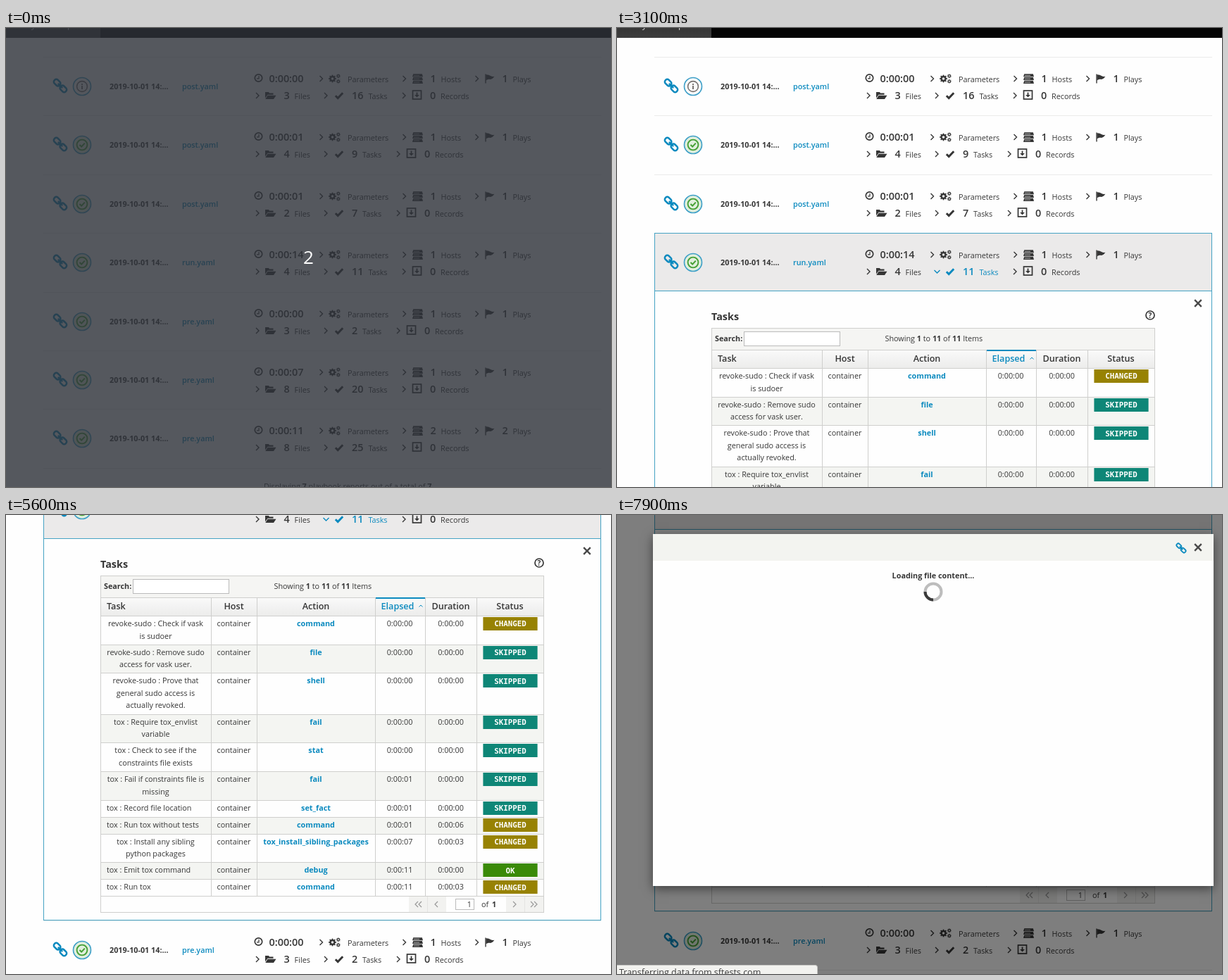
Write an HTML page with a canvas that moves like this. It is 859x652 px and loops after 8 s.

```html
<!DOCTYPE html>
<html lang="en">
<head>
<meta charset="utf-8">
<title>Playbook reports</title>
<style>
html, body { margin: 0; width: 100%; height: 100%; overflow: hidden; background: #fefefe; }
canvas { display: block; }
</style>
</head>
<body>
<canvas id="stage" width="859" height="652"></canvas>
<script>
const W = 859, H = 652, LOOP = 8000, TICK = 100;
const c = document.getElementById('stage').getContext('2d');
const INK = '#363636', BLUE = '#0b8abf', EDGE = '#45a3c4', LINE = '#cfcfcd', PAGE = '#fefefe';
const SANS = '"Open Sans", "Noto Sans", sans-serif';
const MONO = '"DejaVu Sans Mono", monospace';

const ROW_TOP = 41, ROW_H = 83.4, LEFT = 53, RIGHT = 845, OPEN_ROW = 3, OPEN_SHIFT = 541;
// file, elapsed, hosts and plays, files, tasks
const REPORTS = [
  ['post.yaml', '0:00:00', 1, 3, 16],
  ['post.yaml', '0:00:01', 1, 4, 9],
  ['post.yaml', '0:00:01', 1, 2, 7],
  ['run.yaml', '0:00:14', 1, 4, 11],
  ['pre.yaml', '0:00:00', 1, 3, 2],
  ['pre.yaml', '0:00:07', 1, 8, 20],
  ['pre.yaml', '0:00:11', 2, 8, 25]
];
// task lines, action, elapsed seconds, duration seconds, status
const TASKS = [
  ['revoke-sudo : Check if vask|is sudoer', 'command', 0, 0, 'CHANGED'],
  ['revoke-sudo : Remove sudo|access for vask user.', 'file', 0, 0, 'SKIPPED'],
  ['revoke-sudo : Prove that|general sudo access is|actually revoked.', 'shell', 0, 0, 'SKIPPED'],
  ['tox : Require tox_envlist|variable', 'fail', 0, 0, 'SKIPPED'],
  ['tox : Check to see if the|constraints file exists', 'stat', 0, 0, 'SKIPPED'],
  ['tox : Fail if constraints file is|missing', 'fail', 1, 0, 'SKIPPED'],
  ['tox : Record file location', 'set_fact', 1, 0, 'SKIPPED'],
  ['tox : Run tox without tests', 'command', 1, 6, 'CHANGED'],
  ['tox : Install any sibling|python packages', 'tox_install_sibling_packages', 7, 3, 'CHANGED'],
  ['tox : Emit tox command', 'debug', 11, 0, 'OK'],
  ['tox : Run tox', 'command', 11, 3, 'CHANGED']
];
const BADGE = { CHANGED: '#978203', SKIPPED: '#0e8677', OK: '#3a8a08' };
const COLS = [134, 291, 356, 524, 595, 668, 763];
const ROW_HEIGHTS = [0, 23.9, 40.7, 58.3];

// Stepped timelines: [start, value]
const SCROLL = [[0, 0], [4000, 38], [4200, 102], [4300, 151], [4700, 172], [4800, 226], [4900, 270],
  [5000, 292], [5300, 300], [5400, 313], [5500, 327], [5600, 340], [5700, 349], [5800, 353]];
const ROW_HOVER = [[0, -1], [900, 0], [1000, 2], [1100, 3], [1300, 4], [1400, 3], [1500, 4], [1700, 3]];
const TASK_HOVER = [[0, -1], [4300, 3], [5300, -1], [6100, 8]];
const BACKDROP = [[0, 0], [7500, 0.25], [7600, 0.5]];

function at(steps, t) {
  let v = steps[0][1];
  for (const [start, value] of steps) if (t >= start) v = value;
  return v;
}

function box(x, y, w, h, fill) {
  c.fillStyle = fill;
  c.fillRect(x, Math.round(y), w, Math.round(y + h) - Math.round(y));
}
const hline = (x1, x2, y, color) => box(x1, y, x2 - x1, 1, color);
const vline = (x, y1, y2, color) => box(x, y1, 1, y2 - y1, color);

function frame(x, y, w, h, color) {
  c.strokeStyle = color;
  c.lineWidth = 1;
  c.strokeRect(x + 0.5, Math.round(y) + 0.5, w - 1, h - 1);
}

function text(s, x, y, { size = 10.8, weight = 400, color = INK, align = 'left', font = SANS } = {}) {
  c.font = `${weight} ${size}px ${font}`;
  c.textAlign = align;
  c.fillStyle = color;
  c.fillText(s, x, Math.round(y));
}

// Parts between asterisks are bold
function rich(s, x, y) {
  s.split('*').forEach((part, i) => {
    text(part, x, y, { weight: i % 2 ? 700 : 400 });
    x += c.measureText(part).width;
  });
}

function path(points, color, width, close) {
  c.beginPath();
  points.forEach(([x, y], i) => i ? c.lineTo(x, y) : c.moveTo(x, y));
  if (close) c.closePath();
  if (width) {
    c.strokeStyle = color;
    c.lineWidth = width;
    c.stroke();
  } else {
    c.fillStyle = color;
    c.fill();
  }
}

function ring(x, y, r, color, width, from = 0, to = Math.PI * 2) {
  c.beginPath();
  c.arc(x, y, r, from, to);
  c.strokeStyle = color;
  c.lineWidth = width;
  c.stroke();
}

function disc(x, y, r, color) {
  c.beginPath();
  c.arc(x, y, r, 0, Math.PI * 2);
  c.fillStyle = color;
  c.fill();
}

// Draw with the origin moved to x, y
function local(x, y, draw) {
  c.save();
  c.translate(x, y);
  draw();
  c.restore();
}

const icons = {
  chain(x, y, k) {
    local(x, y, () => {
      c.rotate(Math.PI / 4);
      c.scale(k, k);
      c.strokeStyle = BLUE;
      c.lineWidth = 2.5;
      for (const dx of [-11.3, 1.1]) {
        c.beginPath();
        c.roundRect(dx, -3.4, 10.2, 6.8, 3);
        c.stroke();
      }
      path([[-4.5, 0], [4.5, 0]], BLUE, 2.3);
    });
  },
  angle(x, y) {
    path([[x - 2, y - 4], [x + 2, y], [x - 2, y + 4]], INK, 1.4);
  },
  angleDown(x, y) {
    path([[x - 4, y - 2], [x, y + 2], [x + 4, y - 2]], BLUE, 1.4);
  },
  clock(x, y) {
    ring(x, y, 5.2, INK, 1.7);
    path([[x + 0.5, y - 3], [x + 0.5, y + 0.8], [x - 2.5, y + 0.8]], INK, 1.2);
  },
  gear(x, y, r) {
    ring(x, y, r * 0.62, INK, r * 0.5);
    for (let i = 0; i < 8; i++) {
      const a = i * Math.PI / 4, dx = Math.cos(a), dy = Math.sin(a);
      path([[x + dx * r * 0.7, y + dy * r * 0.7], [x + dx * r * 1.12, y + dy * r * 1.12]], INK, r * 0.36);
    }
  },
  cogs(x, y) {
    icons.gear(x - 3, y, 4.8);
    icons.gear(x + 5.3, y - 3.7, 2.6);
    icons.gear(x + 5.3, y + 3.7, 2.6);
  },
  server(x, y) {
    for (const dy of [-6.8, -2, 2.8]) {
      path([[x - 6.3, y + dy], [x + 6.3, y + dy], [x + 7.5, y + dy + 4.1], [x - 7.5, y + dy + 4.1]], INK, 0, true);
      path([[x - 5.5, y + dy + 2.2], [x + 2.5, y + dy + 2.2]], '#ccc', 0.8);
    }
  },
  flag(x, y) {
    path([[x - 5.5, y - 6.5], [x - 5.5, y + 6.5]], INK, 1.4);
    c.beginPath();
    c.moveTo(x - 5, y - 5.8);
    c.quadraticCurveTo(x - 1, y - 6, x + 1.5, y - 4);
    c.quadraticCurveTo(x + 3.5, y - 2.8, x + 6.8, y - 3.2);
    c.quadraticCurveTo(x + 4, y + 1.6, x, y + 0.8);
    c.quadraticCurveTo(x - 2.5, y + 0.2, x - 5, y + 2.4);
    c.fillStyle = INK;
    c.fill();
  },
  folder(x, y) {
    path([[x - 7.5, y + 3.5], [x - 7.5, y - 5], [x - 2.5, y - 5], [x - 1.5, y - 3.5], [x + 4, y - 3.5],
      [x + 4, y - 1.2], [x - 4, y - 1.2]], INK, 0, true);
    path([[x - 4, y - 0.2], [x + 8, y - 0.2], [x + 4.5, y + 5], [x - 7.2, y + 5]], INK, 0, true);
  },
  check(x, y, color) {
    path([[x - 5.2, y + 0.2], [x - 1.8, y + 3.6], [x + 5.2, y - 3.8]], color, 2.9);
  },
  record(x, y) {
    c.strokeStyle = INK;
    c.lineWidth = 1.7;
    c.strokeRect(x - 6, y - 6, 12, 12);
    path([[x, y - 3.5], [x, y + 1]], INK, 1.8);
    path([[x - 3.4, y], [x + 3.4, y], [x, y + 3.6]], INK, 0, true);
  },
  close(x, y) {
    path([[x - 4.8, y - 4.8], [x + 4.8, y + 4.8]], '#4a4a4a', 2.4);
    path([[x + 4.8, y - 4.8], [x - 4.8, y + 4.8]], '#4a4a4a', 2.4);
  },
  help(x, y) {
    ring(x, y, 6, INK, 1.7);
    text('?', x, y + 4, { size: 10, weight: 700, align: 'center' });
  },
  status(x, y, ok) {
    disc(x, y, 13, ok ? '#e0efdd' : '#fafafa');
    ring(x, y, 12.5, '#3d9fc8', 1.6);
    const color = ok ? '#45a035' : '#77716f';
    ring(x, y, 7.4, color, ok ? 1.9 : 1.6);
    if (ok) {
      path([[x - 3.5, y], [x - 0.8, y + 2.6], [x + 3.8, y - 2.4]], color, 2.1);
    } else {
      box(x - 1, y - 4, 2, 2, color);
      box(x - 1, y - 1, 2, 5, color);
    }
  }
};

function count(n, x, y, label, color = INK) {
  text(n, x, y, { size: 14.4, weight: 600, color });
  text(label, x + 6.8 + 8.3 * String(n).length, y, { color });
}

function reportRow([file, time, hosts, files, tasks], top, ok, active) {
  const a = Math.round(top + 31), b = Math.round(top + 55), mid = Math.round(top + 42);
  icons.chain(77, mid - 1, 1);
  icons.status(108, mid, ok);
  text('2019-10-01 14:...', 147, mid + 4, { weight: 700 });
  text(file, 250, mid + 4, { weight: 600, color: BLUE });

  icons.clock(358.5, a - 1);
  text(time, 373.5, a + 5, { size: 14.4, weight: 600 });
  icons.angle(447.5, a);
  icons.cogs(466.5, a);
  text('Parameters', 485, a + 5);
  icons.angle(565.5, a);
  icons.server(584.5, a);
  count(hosts, 602.5, a + 5, 'Hosts');
  icons.angle(668.5, a);
  icons.flag(686.5, a);
  count(hosts, 704.5, a + 5, 'Plays');

  const color = active ? BLUE : INK;
  const dx = tasks > 9 ? 8 : 0;
  icons.angle(357, b);
  icons.folder(375.5, b);
  count(files, 394.5, b + 5, 'Files');
  if (active) icons.angleDown(454.5, b);
  else icons.angle(454, b);
  icons.check(473, b, color);
  count(tasks, 491, b + 5, 'Tasks', color);
  icons.angle(557 + dx, b);
  icons.record(575.5 + dx, b - 1);
  count(0, 594 + dx, b + 5, 'Records');
}

const clockText = s => '0:00:' + String(s).padStart(2, '0');

function pager(top) {
  const y = Math.round(top), m = y + 12;
  for (const x of [572, 710]) {
    box(x, y + 1, 53, 23, '#f2f2f0');
    vline(x + 26, y + 1, y + 24, '#e4e4e2');
  }
  const arrow = (x, d) => path([[x + 2 * d, m - 4], [x - 2 * d, m], [x + 2 * d, m + 4]], '#999', 1.2);
  arrow(583, 1); arrow(588, 1); arrow(611, 1);
  arrow(722, -1); arrow(747, -1); arrow(752, -1);
  frame(638, y + 4, 27, 16, '#bbb');
  text('1', 661, m + 4, { align: 'right' });
  text('of', 675, m + 4);
  text('1', 690, m + 4, { weight: 700 });
}

function taskPanel(hover, linkHot) {
  box(LEFT, 374, RIGHT - LEFT, 542, PAGE);
  icons.close(825, 391);
  text('Tasks', 134, 415, { size: 14.4, weight: 700 });
  icons.help(757, 408);

  box(134, 426, 630, 31, '#f5f5f3');
  text('Search:', 139, 445, { weight: 700 });
  box(180, 431, 137, 21, '#fff');
  frame(180, 431, 137, 21, '#bbb');
  rich('Showing *1* to *11* of *11* Items', 380.5, 445);

  const g = c.createLinearGradient(0, 457, 0, 483);
  g.addColorStop(0, '#fafafa');
  g.addColorStop(1, '#ececeb');
  box(134, 457, 630, 26, g);
  hline(134, 764, 426, LINE);
  hline(134, 764, 457, LINE);
  const head = { size: 12.6, weight: 600, align: 'center' };
  text('Task', 143, 474, { ...head, align: 'left' });
  text('Host', 323.5, 474, head);
  text('Action', 440, 474, head);
  text('Elapsed', 556, 474, { ...head, color: BLUE });
  text('Duration', 631.5, 474, head);
  text('Status', 715.5, 474, head);
  box(524, 457, 71, 2, BLUE);
  path([[586.5, 470.5], [589, 468], [591.5, 470.5]], BLUE, 1);

  let y = 483;
  TASKS.forEach(([task, action, elapsed, duration, status], i) => {
    const lines = task.split('|'), h = ROW_HEIGHTS[lines.length], base = y + 15;
    const hot = i === hover, mid = { align: 'center' };
    box(134, y, 630, h, hot ? '#def2fa' : i % 2 ? '#f4f5f2' : '#fefefe');
    hline(134, 764, y, LINE);
    if (lines.length > 1) lines.forEach((s, n) => text(s, 212.5, base + n * 17.5, mid));
    else text(task, 143, base);
    text('container', 323.5, base, mid);
    text(action, 440, base, { ...mid, weight: 700, color: hot && linkHot ? '#00618a' : BLUE });
    text(clockText(elapsed), 559, base, mid);
    text(clockText(duration), 631.5, base, mid);
    box(677.4, y + 2, 77.2, 19, BADGE[status]);
    text(status, 716, y + 15.3, { ...mid, weight: 700, color: '#fff', font: MONO });
    y += h;
    if (hot) hline(134, 764, y - 1, '#a5d3e6');
  });
  hline(134, 764, y, LINE);
  for (const x of COLS) vline(x, 457, y, LINE);
  pager(y);
  vline(134, 426, y + 24, LINE);
  vline(763, 426, y + 24, LINE);
  hline(134, 764, y + 23, LINE);

  hline(LEFT, RIGHT, 291, EDGE);
  hline(LEFT, RIGHT, 373, EDGE);
  hline(LEFT, RIGHT, 915, EDGE);
  vline(LEFT, 291, 916, EDGE);
  vline(RIGHT - 1, 291, 916, EDGE);
}

function page(t) {
  const open = t >= 3100, hover = at(ROW_HOVER, t);
  const topOf = i => ROW_TOP + i * ROW_H + (open && i > OPEN_ROW ? OPEN_SHIFT : 0);
  c.save();
  c.translate(0, -at(SCROLL, t));

  box(0, 0, W, 14, '#040404');
  const tab = c.createLinearGradient(0, -20, 0, 14);
  tab.addColorStop(0, '#2c2c2c');
  tab.addColorStop(1, '#3d3d3d');
  box(0, 0, 134, 14, tab);
  text('Playbook reports', 18, 0, { size: 12.6, color: '#d5d5d5' });

  REPORTS.forEach((report, i) => {
    const top = topOf(i), active = open && i === OPEN_ROW;
    hline(LEFT, RIGHT, top, '#ebebea');
    if (i === hover) box(LEFT, top, RIGHT - LEFT, ROW_H, '#ebeaea');
    reportRow(report, top, i > 0, active);
  });
  const end = topOf(7);
  hline(LEFT, RIGHT, end, '#ebebea');
  rich('Displaying *7* playbook reports out of a total of *7*', 366, end + 30);
  if (open) taskPanel(at(TASK_HOVER, t), t >= 6400);
  c.restore();
}

function modal(t) {
  const y = t >= 7900 ? 0 : -38;
  c.save();
  c.globalAlpha = t >= 7900 ? 1 : 0.75;
  c.translate(0, y);
  c.shadowColor = 'rgba(0,0,0,.5)';
  c.shadowBlur = 14;
  c.shadowOffsetY = 4;
  box(51, 27, 796, 500, PAGE);
  c.shadowColor = 'transparent';
  box(51, 27, 796, 38, '#f3f4f0');
  icons.chain(801, 47, 0.72);
  icons.close(825, 46);
  text('Loading file content...', 449, 90, { weight: 700, align: 'center' });
  ring(449, 109, 11.5, '#bdbdbd', 4);
  const a = Math.PI / 2 + (t - 7900) / 600 * Math.PI * 2;
  ring(449, 109, 11.5, '#3a3a3a', 4, a, a + Math.PI / 2);
  c.restore();
}

function statusBar(t) {
  if (t < 6400) return;
  const fading = t < 6600, moving = t >= 7800, w = moving ? 285 : 452;
  c.beginPath();
  c.roundRect(-4, 639.5, w + 3.5, 30, 3);
  c.fillStyle = fading ? '#e3e3e0' : '#f2f2ef';
  c.fill();
  c.strokeStyle = '#c2c2bf';
  c.lineWidth = 1;
  c.stroke();
  text(moving ? 'Transferring data from sftests.com'
    : 'https://sftests.com/logs/14/14/1/check/tox-demorepo/fa9996b/ara-report/#',
    3, 654, { size: 12.5, color: fading ? '#6a6a6a' : '#3c3c3c' });
}

function draw(t) {
  box(0, 0, W, H, PAGE);
  page(t);
  const dim = at(BACKDROP, t);
  if (dim) box(0, 0, W, H, `rgba(0,0,0,${dim})`);
  if (t >= 7800) modal(t);
  statusBar(t);
  if (t < 300) {
    box(0, 0, W, H, 'rgba(46,50,57,.81)');
    text(t < 100 ? '2' : '1', 429.5, 335, { size: 26, color: '#fff', align: 'center' });
  }
}

function tick() {
  const t = performance.now() % LOOP;
  draw(Math.floor(t / TICK) * TICK);
  requestAnimationFrame(tick);
}
tick();
</script>
</body>
</html>
```
